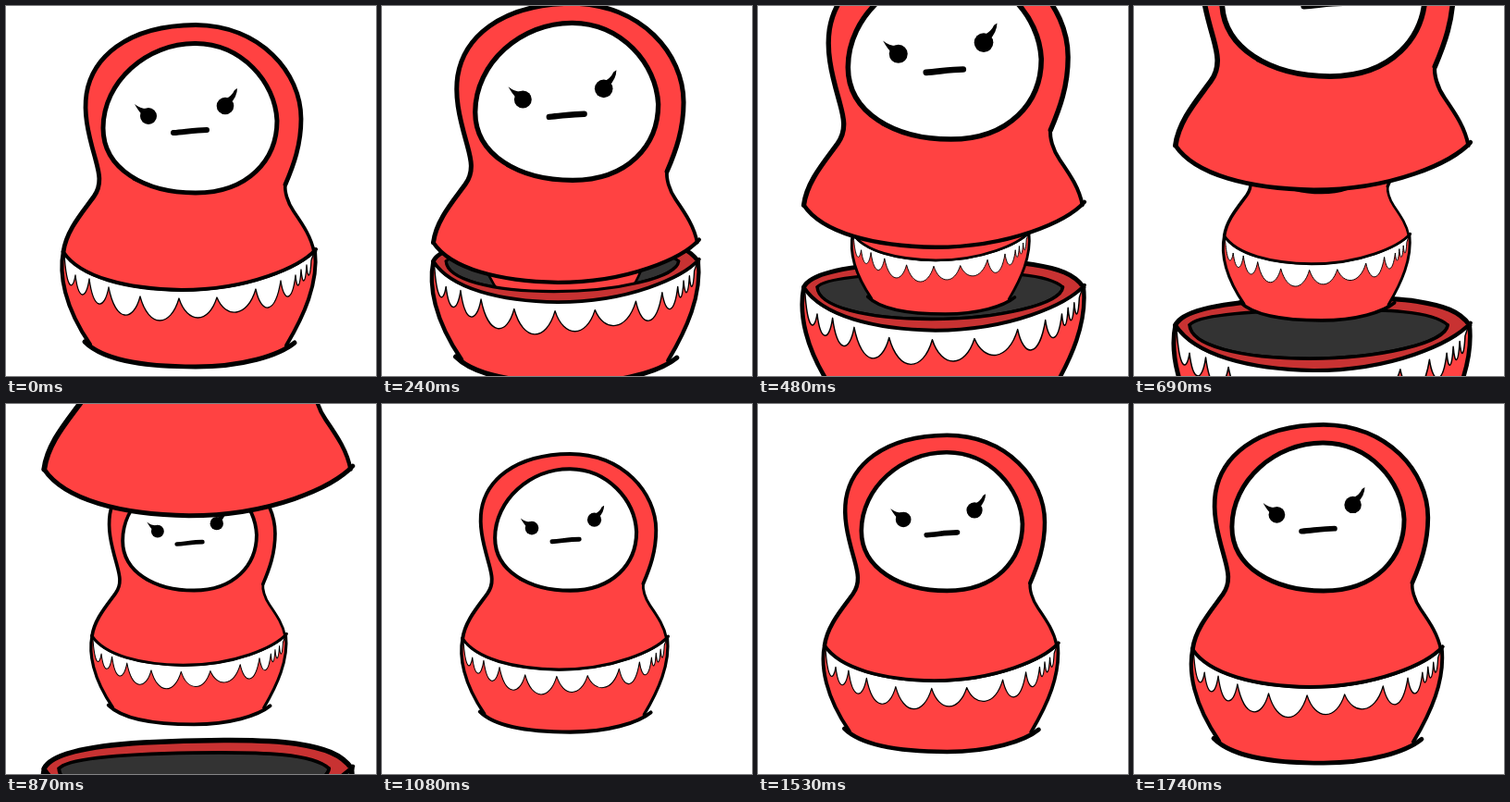
These frames come from a looping animation (400x400 px, 1.77 s). An HTML page:

```html
<!DOCTYPE html>
<html lang="en">
<head>
<meta charset="utf-8">
<title>Nesting doll</title>
<style>
  html, body { margin: 0; width: 100%; height: 100%; overflow: hidden; background: #fff; }
  svg { display: block; width: 100%; height: 100%; }
  .line { fill: none; stroke: #000; stroke-linecap: round; stroke-linejoin: round; }
  .red { fill: #ff4242; }
  .rim { fill: #c83232; }
  .white { fill: #fff; }
</style>
</head>
<body>
<svg viewBox="0 0 400 400">
  <defs>
    <g id="back">
      <path class="rim" d="M62 265C68 252 100 245 150 242S260 239 285 243S325 252 334 265C318 282 262 307 190 307C130 306 80 293 62 265Z"/>
      <path class="line" stroke-width="4.5" d="M62 265C68 252 100 245 150 242S260 239 285 243S325 252 334 265"/>
      <path class="line" stroke-width="3" style="fill:#333" d="M75 265C82 256 130 252 194 251S300 252 314 265C312 282 250 296 186 296S76 284 75 265Z"/>
    </g>

    <g id="bowl">
      <path class="red" d="M62 265C57 290 63 325 90 365C110 385 160 390 205 390C255 390 290 380 304 366C322 335 338 300 334 264C318 282 262 307 190 307C130 306 80 293 62 265Z"/>
      <path class="rim" d="M62 265C80 293 130 306 190 307C262 307 318 282 334 264L314 265C312 282 250 296 186 296S76 284 75 265Z"/>
      <path class="line" stroke-width="3" d="M314 265C312 282 250 296 186 296S76 284 75 265"/>
      <path id="lace" class="line white" style="fill:#fff" stroke-width="1.3"/>
      <g class="line">
        <path stroke-width="3.6" d="M62 265C80 293 130 306 190 307C262 307 318 282 335 263"/>
        <path stroke-width="4.2" d="M62 265C57 290 63 325 91 366"/>
        <path stroke-width="4" d="M334 264C338 300 322 335 303 367"/>
        <path stroke-width="5" d="M85 363C108 386 160 390 205 390C255 390 295 378 312 364"/>
      </g>
    </g>

    <g id="lid">
      <path class="red" d="M62 266C65 243 82 224 95 206C105 192 100 178 96 163C88 135 84 115 87 95C93 58 128 21 205 20.5C275 21 319 72 319 122C319 150 311 172 302 193C301 200 304 212 311 222C322 238 330 250 333 266C318 282 262 307 190 307C130 306 80 293 62 266Z"/>
      <g class="line">
        <path stroke-width="4.8" d="M62 266C65 243 82 224 95 206C105 192 100 178 96 163C88 135 84 115 87 95C93 58 128 21 205 20.5C275 21 319 72 319 122C319 150 311 172 302 193"/>
        <path stroke-width="3.6" d="M302 193C301 200 304 212 311 222C322 238 330 250 333 266"/>
        <path stroke-width="4" d="M62 266C80 293 130 306 190 307C262 307 318 282 335 263"/>
        <path class="white" style="fill:#fff" stroke-width="5" d="M205 40.5C152 40 105 82 105 132C105 176 150 202 205 202C262 202 293 166 293 124C291 82 255 41 205 40.5Z"/>
        <path stroke-width="3" d="M138 187L156 194"/>
        <path stroke-width="6" d="M181 137C194 136 205 134 217 134"/>
      </g>
      <circle cx="154" cy="119" r="9"/>
      <circle cx="237" cy="108" r="9.3"/>
      <path d="M139 106Q145 111 152 111L148 118Q144 115 139 106ZM250 89Q250 98 242 106L236 101Q244 98 247 91Z"/>
    </g>
  </defs>

  <use id="outerBack" href="#back"/>
  <g id="inner"><use href="#bowl"/><use href="#lid"/></g>
  <use id="outerBowl" href="#bowl"/>
  <use id="outerLid" href="#lid"/>
</svg>
<script>
  const LOOP = 1770, STEP = 30, RATIO = 0.63, CX = 197, CY = 200;
  const el = id => document.getElementById(id);

  // Each lobe: depth of its bottom, then the peak that ends it.
  const lobes = [
    [301, 75, 291], [312, 90, 295], [322, 111, 304], [334, 145, 314],
    [340, 187, 316], [337, 228, 315], [331, 270, 306], [326, 297, 297],
    [314, 313, 291], [302, 319, 285], [297, 325, 280], [291, 330, 275]
  ];

  function lacePath() {
    let x = 63, y = 268, d = `M${x} ${y}`;
    for (const [bottom, px, py] of lobes) {
      const pull = (bottom - (y + py) / 8) / 0.75;
      const inset = (px - x) * 0.22;
      d += `C${x + inset} ${pull} ${px - inset} ${pull} ${px} ${py}`;
      [x, y] = [px, py];
    }
    return d + 'L333 266C318 282 262 307 190 307C130 306 80 293 63 268Z';
  }

  function place(id, scale, dx = 0, dy = 0) {
    el(id).setAttribute('transform',
      `translate(${CX} ${CY}) scale(${scale}) translate(${dx - CX} ${dy - CY})`);
  }

  function draw(t) {
    // Camera approaches at constant speed, so size grows as 1 / distance.
    const zoom = 1 / (1 - (1 - RATIO) * t / LOOP);
    const sq = t * t;
    const drift = 1e-5 * sq, drop = 1.24e-4 * sq, lift = -2.27e-4 * sq;
    place('outerBack', zoom, drift, drop);
    place('inner', zoom * RATIO);
    place('outerBowl', zoom, drift, drop);
    place('outerLid', zoom, drift, lift);
  }

  const start = performance.now();
  function tick() {
    const t = (performance.now() - start) % LOOP;
    draw(Math.floor(t / STEP) * STEP);
    requestAnimationFrame(tick);
  }

  el('lace').setAttribute('d', lacePath());
  tick();
</script>
</body>
</html>
```
